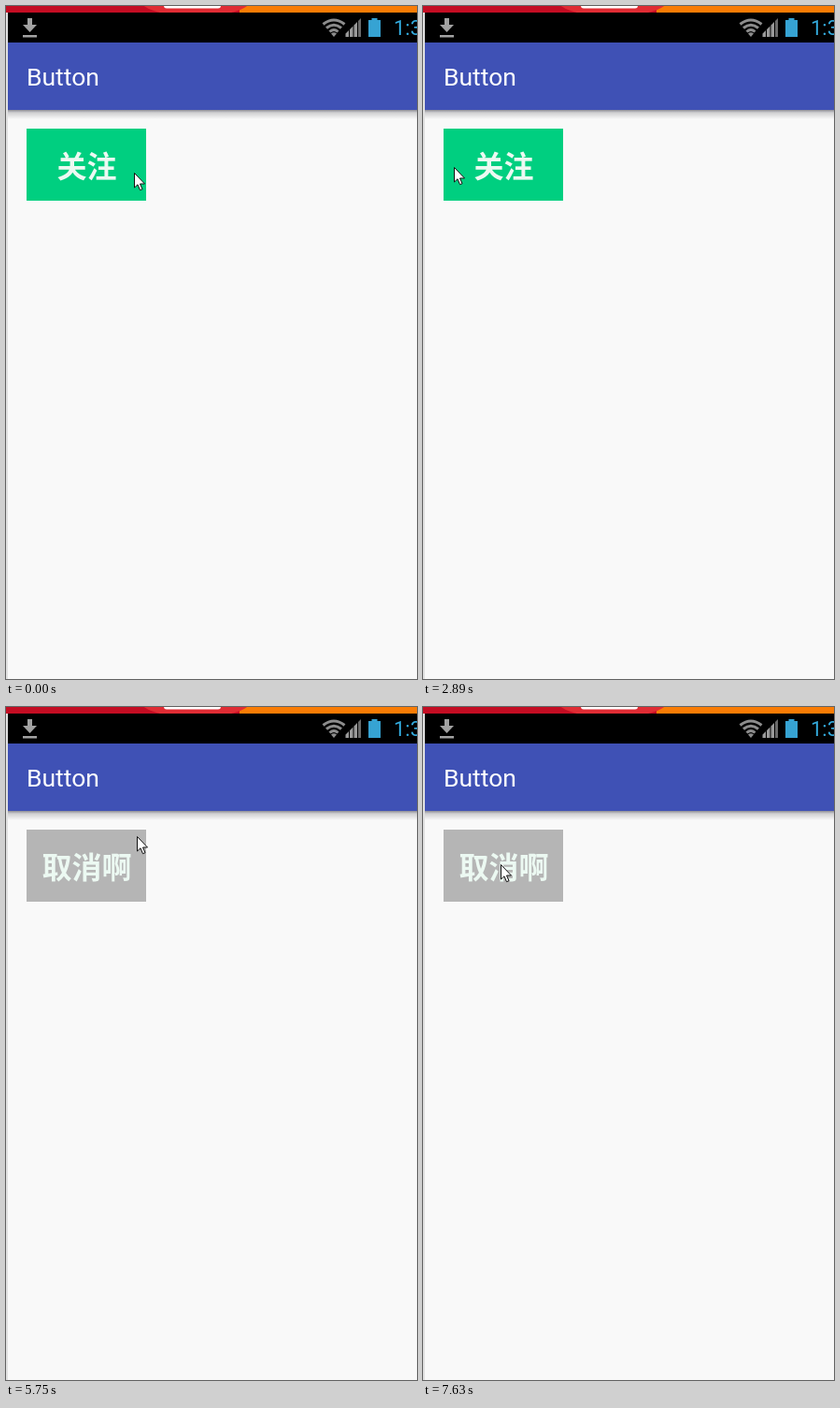
These frames come from a looping animation (440 px wide and 719 px high, 8 s). An HTML page:

```html
<!DOCTYPE html>
<html lang="zh">
<head>
<meta charset="utf-8">
<title>Button</title>
<style>
  html, body { margin: 0; width: 100%; height: 100%; overflow: hidden; background: #f9f9f9; }
  svg { display: block; }
  .bar { font-family: Roboto, sans-serif; }
  #label { font: 700 32px "Noto Sans CJK SC", "Noto Sans CJK", sans-serif; fill: #ecf9f2; text-anchor: middle; }
</style>
</head>
<body>
<svg width="440" height="719" viewBox="0 0 440 719">
  <defs>
    <linearGradient id="shade" x2="0" y2="1">
      <stop stop-color="#8d8d95"/>
      <stop offset=".3" stop-color="#d0d0d2"/>
      <stop offset="1" stop-color="#f9f9f9"/>
    </linearGradient>
    <clipPath id="strip"><path d="M0 0H440V7H0Z"/></clipPath>
    <clipPath id="face"><path d="M22 131H150V208H22Z"/></clipPath>
  </defs>

  <rect width="440" height="719" fill="#f9f9f9"/>
  <g clip-path="url(#strip)">
    <rect width="250" height="7" fill="#c40d23"/>
    <rect x="250" width="190" height="7" fill="#f97c05"/>
    <ellipse cx="203" cy="-5" rx="58" ry="16" fill="#e02c34"/>
    <rect x="169" y="-6" width="61" height="8.5" rx="3" fill="#fff"/>
  </g>

  <rect y="7" width="2" height="712" fill="#e1e1e1"/>
  <rect x="2" y="7" width="438" height="32" fill="#000"/>
  <path d="M23 13H28V20H33L25.500 28 18 20H23ZM18 31H33V33.500H18Z" fill="#a2a2a2"/>
  <g fill="none" stroke="#8c8c8c" stroke-width="3">
    <path d="M339.500 19.500Q351 10.500 362.500 19.500M343 23.500Q351 17 359 23.500M346.500 27.500Q351 23.500 355.500 27.500"/>
  </g>
  <path d="M348 29.500Q351 27 354 29.500L351 33Z" fill="#8c8c8c"/>
  <path d="M363.500 33V29.500L367 26V33ZM368 33V25L371.500 21.500V33ZM372.500 33V20.500L376 17V33Z" fill="#9a9a9a"/>
  <path d="M377 33V16L380 13V33Z" fill="#6a6a6a"/>
  <path d="M391.500 13H397.500V15H401V33H388V15H391.500Z" fill="#36a3d3"/>
  <text class="bar" x="415" y="31" font-size="22" fill="#33a9db">1:3</text>

  <rect x="2" y="39" width="438" height="72" fill="#3f51b5"/>
  <rect x="2" y="111" width="438" height="10" fill="url(#shade)"/>
  <text class="bar" x="22" y="85" font-size="26.500" fill="#fff">Button</text>

  <g clip-path="url(#face)">
    <rect id="base" x="22" y="131" width="128" height="77"/>
    <circle id="ripple"/>
  </g>
  <text id="label" x="86.500" y="182.500"></text>
  <path id="cursor" d="M.5 .5V16L4 12.800 6.500 18.700 9 17.700 6.500 12H11.500Z" fill="#fff" stroke="#111" stroke-width="1"/>
</svg>
<script>
const LOOP = 8000, SPEED = 0.43; // ripple speed in px per ms
const looks = [
  { color: '#00cf80', text: '关注' },
  { color: '#b5b5b5', text: '取消啊' },
];

// Pointer path: time, x, y; each place holds until the next.
const path = [
  [0, 137, 178], [150, 139, 190], [270, 141, 201],
  [1370, 108, 201], [1490, 68, 202], [1640, 41, 204], [1790, 26, 204],
  [2770, 29, 190], [2890, 33, 172], [3040, 33, 150], [3190, 33, 144],
  [3590, 31, 142], [3710, 30, 140],
  [4650, 34, 140], [4800, 81, 140], [4950, 103, 140], [5070, 121, 140],
  [5190, 135, 140], [5340, 145, 140], [5620, 142, 139], [5750, 140, 138],
  [6540, 140, 150], [6660, 132, 165], [6810, 104, 168], [6930, 85, 169], [7080, 83, 168],
];

// Each tap: when its ripple starts, and the times at which it is redrawn.
const taps = [
  { start: 643, ticks: [670, 790, 910, 1060] },
  { start: 2260, ticks: [2380, 2500, 2620] },
  { start: 4084, ticks: [4110, 4230, 4380, 4500] },
  { start: 6095, ticks: [6150, 6270, 6390, 6540] },
  { start: 7360, ticks: [7360, 7510, 7630] },
];

const $ = id => document.getElementById(id);
const base = $('base'), ripple = $('ripple'), label = $('label'), cursor = $('cursor');
const pointerAt = t => path.findLast(p => p[0] <= t);

function draw(t) {
  const [, x, y] = pointerAt(t);
  cursor.setAttribute('transform', `translate(${x} ${y})`);

  const count = taps.filter(tap => tap.ticks[0] <= t).length;
  const look = looks[count % 2];
  label.textContent = look.text;
  base.setAttribute('fill', looks[count ? (count + 1) % 2 : 0].color);
  ripple.setAttribute('fill', look.color);

  let radius = 0;
  if (count) {
    const { start, ticks } = taps[count - 1];
    const [, cx, cy] = pointerAt(ticks[0]);
    radius = SPEED * (ticks.findLast(tick => tick <= t) - start);
    ripple.setAttribute('cx', cx);
    ripple.setAttribute('cy', cy);
  }
  ripple.setAttribute('r', radius);
}

const began = performance.now();
function frame() {
  draw((performance.now() - began) % LOOP);
  requestAnimationFrame(frame);
}
frame();
</script>
</body>
</html>
```
